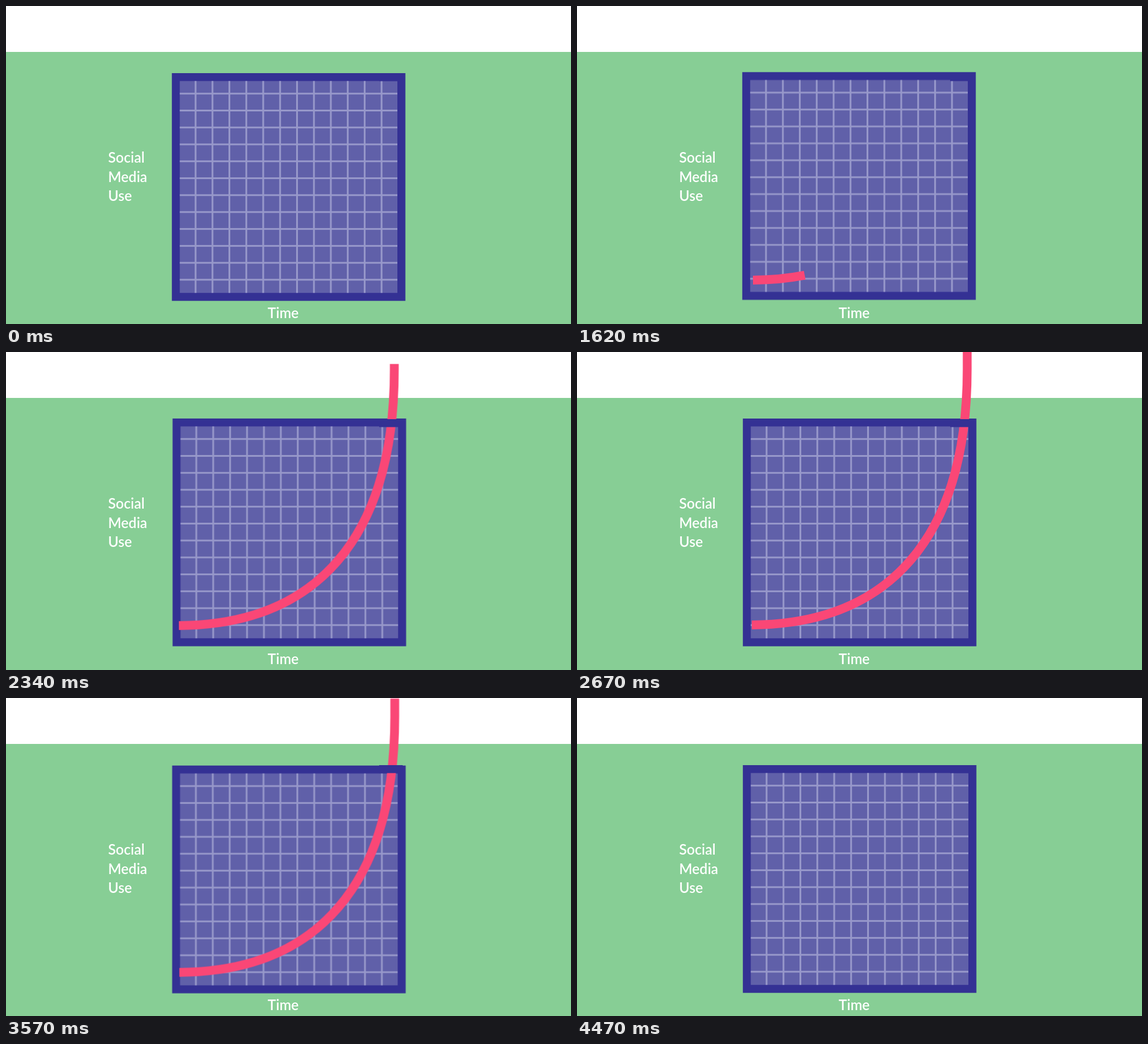
Write an HTML page that moves like this. It is 960 px wide and 540 px high and loops after 4500 ms.

```html
<!DOCTYPE html>
<html lang="en">
<head>
<meta charset="utf-8">
<title>Social media use over time</title>
<style>
  html, body { margin: 0; width: 100%; height: 100%; overflow: hidden; background: #fff; }
  svg { display: block; width: 960px; height: 540px; }
  text { font: 600 24px Raleway, Lato, sans-serif; fill: #fff; }

  .chart, .trend { animation: 4.5s ease-in-out infinite; }
  .chart { animation-name: shake-chart; }
  .trend { animation-name: shake-trend; }
  .curve {
    fill: none;
    stroke: #fa4776;
    stroke-width: 15;
    stroke-dasharray: 682 700;
    animation: grow 4.5s cubic-bezier(.33, 0, .67, 1) infinite;
  }

  /* A short first stroke, a pause, then a fast climb; cut at the end */
  @keyframes grow {
    0%, 5% { stroke-dashoffset: 684px; }
    30.22%, 41.67% { stroke-dashoffset: 593px; }
    53.33%, 99.32% { stroke-dashoffset: 0px; }
    99.33%, 100% { stroke-dashoffset: 684px; }
  }

  @keyframes shake-chart {
    0%, 16.8% { transform: translate(0, 0); }
    19.33% { transform: translate(-1.6px, -1.6px); }
    22.67% { transform: translate(.8px, .2px); }
    26% { transform: translate(1.8px, 1.8px); }
    29.33% { transform: translate(-1px, -.5px); }
    32.67% { transform: translate(2.6px, 1.6px); }
    36% { transform: translate(-1px, -1.7px); }
    39.33% { transform: translate(-2.8px, 1px); }
    42.67% { transform: translate(-1.8px, -1.5px); }
    44% { transform: translate(-1.3px, -.8px); }
    46% { transform: translate(1.6px, 1.7px); }
    49.33% { transform: translate(-2px, .5px); }
    52.67% { transform: translate(1.5px, -1.2px); }
    56% { transform: translate(2.3px, 1.8px); }
    59.33% { transform: translate(0, -1px); }
    62.67% { transform: translate(-2px, 1.2px); }
    66% { transform: translate(1px, -1.4px); }
    69.33% { transform: translate(1.6px, 1px); }
    72.67% { transform: translate(-1.4px, .6px); }
    76% { transform: translate(-.6px, -1px); }
    79.33% { transform: translate(.5px, .7px); }
    82.67% { transform: translate(-.8px, -.6px); }
    86% { transform: translate(1px, .9px); }
    89.33% { transform: translate(-.7px, -.8px); }
    92.67% { transform: translate(-1.3px, .7px); }
    96% { transform: translate(.9px, -.7px); }
    99.33%, 100% { transform: translate(0, 0); }
  }

  @keyframes shake-trend {
    0%, 16.8% { transform: translate(0, 0); }
    19.33% { transform: translate(1px, .8px); }
    22.67% { transform: translate(0, -.3px); }
    26% { transform: translate(2px, 1px); }
    29.33% { transform: translate(-1px, -1px); }
    32.67% { transform: translate(1px, -.8px); }
    36% { transform: translate(4px, 1px); }
    39.33% { transform: translate(1px, -1px); }
    42.67% { transform: translate(2.5px, 1px); }
    44% { transform: translate(2px, .6px); }
    46% { transform: translate(-1px, -1px); }
    49.33% { transform: translate(1px, 1px); }
    52.67% { transform: translate(-1.5px, 0); }
    56% { transform: translate(-1px, 1px); }
    59.33% { transform: translate(2px, -1px); }
    62.67% { transform: translate(0, 1px); }
    66% { transform: translate(-1px, -1px); }
    69.33% { transform: translate(1px, 0); }
    72.67% { transform: translate(1.2px, -.8px); }
    76% { transform: translate(.5px, .6px); }
    79.33% { transform: translate(-.5px, 1.4px); }
    82.67% { transform: translate(.8px, 0); }
    86% { transform: translate(-.8px, -.8px); }
    89.33% { transform: translate(.6px, .8px); }
    92.67% { transform: translate(1px, -.4px); }
    96% { transform: translate(-.6px, .5px); }
    99.33%, 100% { transform: translate(0, 0); }
  }
</style>
</head>
<body>
<svg viewBox="0 0 960 540">
  <defs>
    <pattern id="grid" x="320.6" y="147.3" width="28.73" height="28.73" patternUnits="userSpaceOnUse">
      <path d="M0 1.5H28.73M1.5 0V28.73" stroke="#9798ca" stroke-width="3"/>
    </pattern>
  </defs>

  <rect y="78" width="960" height="462" fill="#87ce95"/>

  <text x="173.5" y="266">Social</text>
  <text x="173.5" y="298.5">Media</text>
  <text x="173.5" y="331">Use</text>
  <text x="444.5" y="530">Time</text>

  <g class="chart">
    <rect x="281.8" y="114" width="396.8" height="386.7" fill="#343194"/>
    <rect x="295.3" y="127.4" width="369.7" height="359.8" fill="#6060a9"/>
    <rect x="295.3" y="127.4" width="369.7" height="359.8" fill="url(#grid)"/>
  </g>

  <g class="trend">
    <path class="curve" pathLength="682" d="M295 464.5C528 463 661 316 661 30V-.5"/>
  </g>

  <!-- Fixed piece of the border that hides the curve where it leaves the chart -->
  <rect x="634" y="114" width="40" height="13.5" fill="#343194"/>
</svg>
</body>
</html>
```
